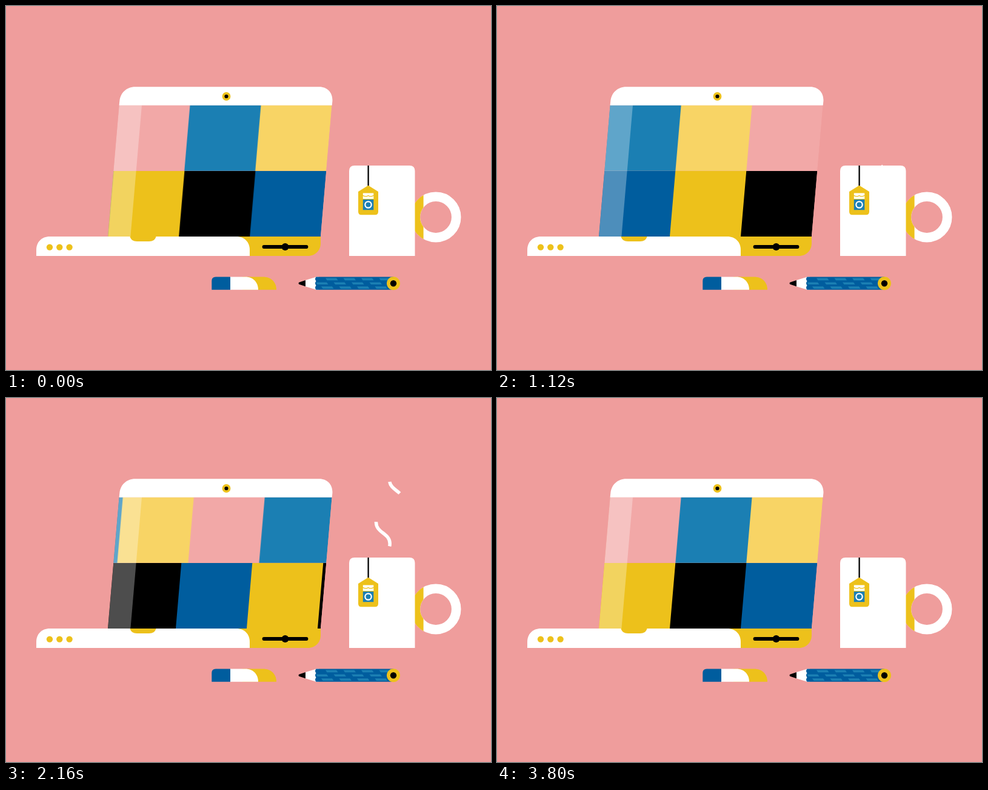
Recreate the animation shown at these times as an HTML page. Size 800 px wide and 600 px high, loop 4160 ms.

```html
<!DOCTYPE html>
<html lang="en">
<head>
<meta charset="utf-8">
<title>Desk</title>
<style>
  html, body { margin: 0; width: 100%; height: 100%; overflow: hidden; background: #ef9d9c; }
  svg { display: block; width: 800px; height: 600px; }
  .white { fill: #fff; }
  .yellow { fill: #edc11b; }
  .navy { fill: #005d9e; }
  .blue { fill: #1b7fb3; }
  .steam { fill: none; stroke: #fff; stroke-width: 5.5; stroke-dasharray: 0 0 0 999; }
</style>
</head>
<body>
<svg viewBox="0 0 800 600">
  <defs>
    <clipPath id="screen"><rect y="163.5" width="351" height="216.8"/></clipPath>
    <clipPath id="grip"><rect x="670" y="300" width="18.6" height="96"/></clipPath>
    <path id="wisp" d="M632.5 275C632.5 257.5 655.2 257.5 655.2 240S632.5 222.5 632.5 205 655.2 187.5 655.2 170 632.5 152.5 632.5 135"/>
    <circle id="ring" cx="709" cy="348" r="33.7" fill="none" stroke-width="15.6"/>
  </defs>

  <!-- screen -->
  <g transform="matrix(1 0 -.0861 1 200.7 0)">
    <g clip-path="url(#screen)">
      <g id="top"></g>
      <g id="bottom"></g>
      <rect class="white" y="163" width="37.4" height="218" opacity=".3"/>
    </g>
  </g>

  <!-- laptop -->
  <path class="white" d="M186.6 163.7L187.3 157C188.5 143 199 133.2 213 133.2H517C530 133.2 539.4 143 538.4 157L537.7 163.7Z"/>
  <circle class="yellow" cx="363.5" cy="149" r="6.9"/>
  <circle cx="363.5" cy="149" r="3.1"/>
  <path class="yellow" d="M376 380H519V391C519 403 510 412 498 412H376Z"/>
  <path class="white" d="M50 412V402C50 389 59 380 72 380H380C393 380 402 389 402 402V412Z"/>
  <path class="yellow" d="M204.5 380H247.5C246.500 385 242 388 236 388H216C210 388 205.500 385 204.500 380Z"/>
  <g class="yellow">
    <circle cx="72" cy="397.6" r="5.2"/>
    <circle cx="88.3" cy="397.6" r="5.2"/>
    <circle cx="104.6" cy="397.6" r="5.2"/>
  </g>
  <path d="M425.500 397H495.500" stroke="#000" stroke-width="5.800" stroke-linecap="round"/>
  <circle cx="460.500" cy="397" r="6"/>

  <!-- mug -->
  <use class="steam" href="#wisp"/>
  <use class="steam" href="#wisp" x="-22"/>
  <use href="#ring" stroke="#fff"/>
  <use href="#ring" stroke="#edc11b" clip-path="url(#grip)"/>
  <path class="white" d="M566 412V272Q566 263 575 263H665.500Q674.500 263 674.500 272V412Z"/>
  <path d="M597.600 263V298" stroke="#000" stroke-width="2.300"/>
  <path class="yellow" d="M597.500 295.800L614 306V339Q614 344.300 608.700 344.300H586.300Q581 344.300 581 339V306Z"/>
  <rect class="white" x="588.800" y="308.400" width="17.500" height="9.600"/>
  <path d="M588 312Q593 315.500 597.500 312.500Q602 315.500 607 312" fill="none" stroke="#edc11b" stroke-width="1.400"/>
  <rect class="blue" x="588.800" y="319" width="17.500" height="17.200"/>
  <circle cx="597.500" cy="327.500" r="5.200" fill="none" stroke="#fff" stroke-width="2.200"/>

  <!-- eraser -->
  <path class="yellow" d="M390 446.500H424C437 446.500 446 455 446 467.700H390Z"/>
  <path class="white" d="M369 446.500H395C407 446.500 416 455 416 467.700H369Z"/>
  <path class="navy" d="M339.300 467.700V453Q339.300 446.500 346 446.500H370V467.700Z"/>

  <!-- pencil -->
  <path class="white" d="M493 452.300L512 446.500H516V467.700H512L493 462Z"/>
  <path d="M494 452V462.300L483.500 458.800Q481.600 457.200 483.500 455.600Z"/>
  <path class="navy" d="M511.500 446.500H639V467.700H511.500Q508.500 464.200 511.500 460.700Q508.500 457.100 511.500 453.500Q508.500 450 511.500 446.500Z"/>
  <path id="grain" class="blue"/>
  <circle class="yellow" cx="639" cy="457.200" r="11"/>
  <circle cx="639" cy="457.200" r="5.200"/>
</svg>
<script>
  const LOOP = 4160, TILE = 117, SLIDE = 1000;
  const starts = [0, 1400, 2800];
  const $ = id => document.getElementById(id);
  const loop = { duration: LOOP, iterations: Infinity };

  function addTiles(row, colors, first, y) {
    for (let i = 0; i < 6; i++) {
      const r = document.createElementNS("http://www.w3.org/2000/svg", "rect");
      const box = { x: (first + i) * TILE, y, width: TILE + 1, height: 109, fill: colors[i % 3] };
      for (const key in box) r.setAttribute(key, box[key]);
      row.append(r);
    }
  }

  // Each row steps one tile at a time, three tiles per loop.
  function slide(row, dir, easing) {
    const at = n => `translateX(${dir * n * TILE}px)`;
    const frames = starts.flatMap((t, i) => [
      { offset: t / LOOP, transform: at(i), easing },
      { offset: (t + SLIDE) / LOOP, transform: at(i + 1) }
    ]);
    frames.push({ offset: 1, transform: at(3) });
    return row.animate(frames, loop);
  }

  // time, tail and head of a wisp along its path
  const trim = [
    [1080, 0, 9.5], [1120, 0, 12.7], [1240, 0, 22], [1360, 0, 34.7],
    [1520, 20, 58], [1680, 39, 87.4], [1760, 45.5, 105], [1840, 55, 122],
    [1920, 73, 139], [2000, 97, 154], [2080, 122, 165], [2160, 144.5, 170.6],
    [2240, 162, 170.6], [2320, 170.6, 170.6]
  ];

  function rise(wisp, delay) {
    const dash = (tail, head) => `0 ${tail} ${head - tail} 999`;
    const frames = trim.map(([t, tail, head]) => ({
      offset: (t + delay) / LOOP, strokeDasharray: dash(tail, head)
    }));
    const hidden = dash(0, 0), gone = dash(170.6, 170.6);
    return wisp.animate([
      { offset: 0, strokeDasharray: hidden },
      { offset: (1000 + delay) / LOOP, strokeDasharray: hidden },
      ...frames,
      { offset: 1, strokeDasharray: gone }
    ], loop);
  }

  function grain() {
    let d = "";
    [[527, 448.6], [511, 455.4], [520, 462.3]].forEach(([x0, y]) => {
      for (let x = x0; x < 628; x += 29.5) {
        const w = Math.min(18, 632 - x);
        d += `M${x} ${y}h${w}l2.5 3.6h${-w}z`;
      }
    });
    $("grain").setAttribute("d", d);
  }

  addTiles($("top"), ["#f2a8a7", "#1b7fb3", "#f8d465"], 0, 163);
  addTiles($("bottom"), ["#edc11b", "#000", "#005d9e"], -3, 272);
  grain();

  const [wispA, wispB] = document.querySelectorAll(".steam");
  const parts = [
    slide($("top"), -1, "cubic-bezier(.61, 0, .3, 1)"),
    slide($("bottom"), 1, "cubic-bezier(.68, 0, .22, 1)"),
    rise(wispA, 0),
    rise(wispB, 480)
  ];
  const now = document.timeline.currentTime;
  parts.forEach(p => { p.startTime = now; });
</script>
</body>
</html>
```
